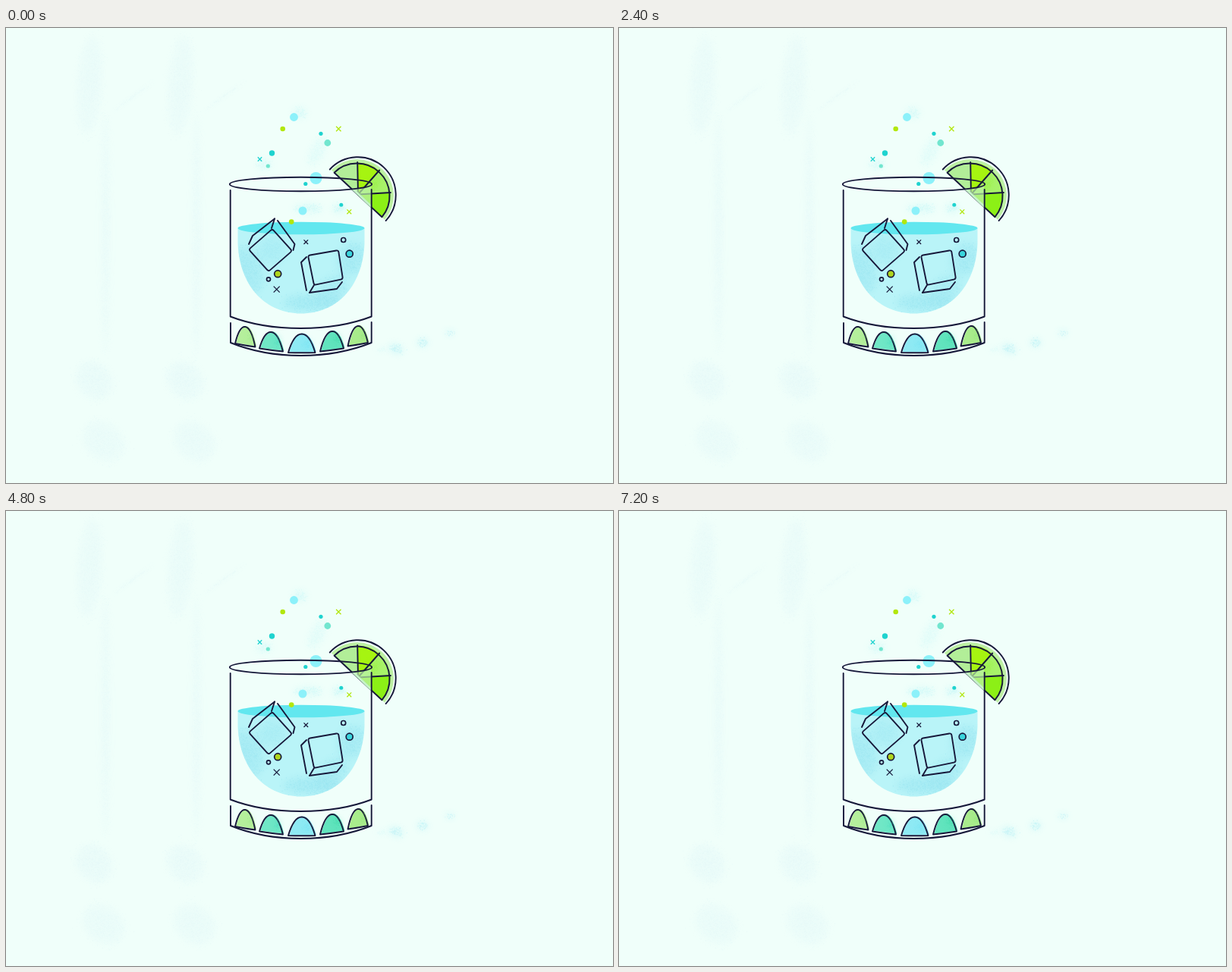
Animation of 800 by 600 pixels, one loop 8000 ms. Source, as an HTML page:

```html
<!DOCTYPE html>
<html lang="en">
<head>
<meta charset="utf-8">
<title>Fizzy drink</title>
<style>
html, body { margin: 0; width: 100%; height: 100%; overflow: hidden; background: #effffa; }
svg { display: block; width: 100vw; height: 100vh; }
.ink { fill: none; stroke: #17183a; stroke-width: 1.9; stroke-linecap: round; stroke-linejoin: round; }
</style>
</head>
<body>
<svg id="stage" viewBox="0 0 800 600"></svg>
<script>
const STEP = 800, LOOP = 8000, POSES = 3;
const INK = '#17183a';
const stage = document.getElementById('stage');

let seed = 7;
const rnd = () => (seed = (seed * 16807) % 2147483647) / 2147483647;
const bell = () => (rnd() + rnd() + rnd() - 1.5) / 1.5;
const mix = (a, b, k) => a + (b - a) * k;

function add(parent, tag, attrs) {
  const el = document.createElementNS('http://www.w3.org/2000/svg', tag);
  for (const name in attrs) el.setAttribute(name, attrs[name]);
  parent.appendChild(el);
  return el;
}
const group = (parent, attrs) => add(parent, 'g', attrs);
const shape = (parent, d, fill) => add(parent, 'path', { d, fill });
const ink = (parent, d) => add(parent, 'path', { d, class: 'ink' });
const dot = (parent, cx, cy, r, fill) => add(parent, 'circle', { cx, cy, r, fill });

function cross(parent, x, y, s, stroke) {
  add(parent, 'path', {
    d: `M${x - s} ${y - s}l${2 * s} ${2 * s}m0 ${-2 * s}l${-2 * s} ${2 * s}`,
    stroke, 'stroke-width': 1.3, fill: 'none'
  });
}

// Soft cloud of fine grains
function spray(parent, x, y, rx, ry, color, opacity, turn = 0) {
  let d = '';
  const n = Math.min(900, Math.round(rx * ry * 0.5));
  for (let i = 0; i < n; i++) {
    d += `M${(bell() * rx).toFixed(1)} ${(bell() * ry).toFixed(1)}h1`;
  }
  const g = group(parent, { transform: `translate(${x} ${y}) rotate(${turn})`, opacity });
  add(g, 'ellipse', { rx: rx * 0.75, ry: ry * 0.75, fill: color, opacity: 0.55, filter: 'url(#soft)' });
  add(g, 'path', { d, stroke: color, 'stroke-width': 1 });
}

function defs() {
  const d = add(stage, 'defs', {});
  const soft = add(d, 'filter', { id: 'soft', x: '-60%', y: '-60%', width: '220%', height: '220%' });
  add(soft, 'feGaussianBlur', { stdDeviation: 4 });
  const clip = add(d, 'clipPath', { id: 'liquid' });
  shape(clip, LIQUID, '#000');
  const inside = add(d, 'clipPath', { id: 'inside' });
  shape(inside, 'M296 207A93 9.5 0 0 0 481 207V260H296Z', '#000');
}

const LIQUID = 'M305.5 264V284C308 343 344 376.5 389 376.5S470 343 472.500 284V264Z';

function smudges(g) {
  for (const x of [0, 120]) {
    const tree = group(g, { transform: `translate(${x} 0)` });
    spray(tree, 110, 75, 22, 85, '#d9f2f6', 0.35, 4);
    spray(tree, 131, 270, 9, 210, '#d9f2f6', 0.3);
    spray(tree, 116, 465, 36, 30, '#d9f2f6', 0.4, 52);
    spray(tree, 128, 545, 40, 32, '#d9f2f6', 0.35, 40);
    spray(tree, 168, 90, 42, 3, '#d9f2f6', 0.3, -36);
  }
  spray(g, 514, 423, 14, 9, '#a9edf5', 0.55, 20);
  spray(g, 549, 415, 10, 8, '#a9edf5', 0.6);
  spray(g, 585, 402, 8, 6, '#a9edf5', 0.45);
  spray(g, 495, 424, 8, 5, '#a9edf5', 0.2);
}

function liquid(g, k) {
  shape(g, LIQUID, ['#b9f4f8', '#b8f5f7', '#b7f6f6'][k * 2]);
  const c = group(g, { 'clip-path': 'url(#liquid)' });
  const tint = k ? '#86ecef' : '#8fe0ee';
  spray(c, mix(318, 340, k), mix(320, 300, k), 28, 42, tint, 0.55, -15);
  spray(c, mix(405, 350, k), mix(362, 350, k), 52, 16, tint, 0.6);
  spray(c, mix(455, 418, k), mix(305, 318, k), 24, 30, tint, 0.55, 20);
  spray(c, mix(350, 455, k), mix(292, 288, k), 26, 24, tint, 0.4);
  spray(c, 430, mix(345, 350, k), 30, 22, tint, 0.45, -35);
  add(g, 'ellipse', { cx: 389, cy: 264, rx: 83.5, ry: 8.3, fill: k === 1 ? '#43e5ec' : '#62e7ef' });
}

const LIME = { x: 464, y: 220 };
function rim(r, deg) {
  const a = deg * Math.PI / 180;
  return `${(LIME.x + r * Math.cos(a)).toFixed(1)} ${(LIME.y + r * Math.sin(a)).toFixed(1)}`;
}
function wedge(g, from, to, fill) {
  shape(g, `M464 219.500L${rim(42.5, from)}A42.5 42.5 0 0 1 ${rim(42.5, to)}Z`, fill);
}

function lime(g, k) {
  shape(g, `M${rim(48, -137)}A48 48 0 0 1 ${rim(48, 43)}Z`, k ? '#b5f49d' : '#bdf0a4');
  wedge(g, -137, -91, k ? '#b4f39b' : '#b2ee98');
  wedge(g, -91, -49, '#a6f411');
  wedge(g, -49, -4, k ? '#aff39f' : '#a8f36a');
  wedge(g, -4, 43, k ? '#a6f411' : '#8cf016');
  spray(g, 484, 206, 15, 10, '#92ee2c', k ? 0.2 : 0.45, -40);
  ink(g, `M${rim(50, -138)}A50 50 0 0 1 ${rim(50, 43)}`);
  ink(g, `M${rim(43, -137)}A43 43 0 0 1 ${rim(43, 43)}Z`);
  ink(g, `M464 219.500L${rim(43, -91)}M464 219.500L${rim(43, -49)}M464 219.500L${rim(43, -4)}`);
  // Part seen through the glass is paler
  const veil = group(g, { 'clip-path': 'url(#inside)' });
  shape(veil, `M${rim(51, -137)}A51 51 0 0 1 ${rim(51, 43)}L${rim(51, -137)}`, 'rgba(188,243,168,.7)');
  add(veil, 'path', { d: 'M440 196L482 236', stroke: '#c5f3c8', 'stroke-width': 3 });
}

function arch(g, x0, y0, x1, y1, ax, ay, fill) {
  const cy = (ay - (y0 + y1) / 8) / 0.75;
  const bend = (x1 - x0) * 0.27;
  const d = `M${x0} ${y0}C${x0 + bend} ${cy} ${x1 - bend} ${cy} ${x1} ${y1}Q${ax} ${(y0 + y1) / 2 + 0.5} ${x0} ${y0}Z`;
  add(g, 'path', { d, fill, transform: 'translate(1.5 -1)' });
  ink(g, d);
}

function glass(g) {
  add(g, 'ellipse', { cx: 388.5, cy: 206, rx: 93.7, ry: 9.3, class: 'ink' });
  ink(g, 'M295.700 214V380.500Q336 396 388.600 396T481.700 380.500V213');
  ink(g, 'M296 389V415Q338 432 388.600 432T481.700 415V388');
  arch(g, 302, 416, 328.5, 420.5, 315, 394, '#b5ef9c');
  arch(g, 334, 422.5, 365, 426.5, 349.5, 401, '#70e7c6');
  arch(g, 372, 428, 407.5, 428, 390, 403.5, '#8feaf4');
  arch(g, 414, 426.5, 445, 422.5, 429, 400, '#62e4be');
  arch(g, 450.5, 419.5, 477, 415, 464, 393, '#a9ec8c');
  spray(g, 322, 408, 5, 8, '#8de47d', 0.4);
  spray(g, 357, 413, 6, 10, '#3fd9bd', 0.45);
  spray(g, 396, 417, 9, 9, '#6adff0', 0.4);
  spray(g, 436, 411, 7, 9, '#36d6a4', 0.45);
  spray(g, 470, 405, 5, 8, '#7fe070', 0.4);
}

// Eleven points per cube: four for the face, seven for the visible sides
const CUBES = [
  [[320, 292, 351, 265, 377, 294, 346, 321, 320, 285, 325, 274, 354, 251.5, 350, 264, 358, 254, 380.5, 285, 378.5, 293],
   [321, 281, 360, 266, 372, 303, 333, 318, 322, 276, 331, 266, 364, 254, 361, 264, 367, 258, 380, 293, 374, 301]],
  [[406, 339, 398, 300, 438, 293, 444, 331, 396, 302, 389, 309, 396, 346, 396, 346, 443, 335, 436, 344, 400, 349],
   [402, 337, 401, 297, 439, 293, 444, 331, 398, 299, 390, 307, 394, 343, 394, 343, 442, 335, 433, 342.5, 397, 347]]
];

function cube(g, [a, b], k, low) {
  const p = i => [mix(a[2 * i], b[2 * i], k), mix(a[2 * i + 1], b[2 * i + 1], k)];
  const line = (...ids) => ink(g, 'M' + ids.map(i => p(i).join(' ')).join('L'));
  let face = '';
  for (let i = 0; i < 4; i++) {
    const q = p(i), before = p((i + 3) % 4), after = p((i + 1) % 4);
    const near = o => [mix(q[0], o[0], 0.07), mix(q[1], o[1], 0.07)].join(' ');
    face += `${i ? 'L' : 'M'}${near(before)}Q${q.join(' ')} ${near(after)}`;
  }
  ink(g, face + 'Z');
  line(4, 5, 6);
  line(8, 9, 10);
  if (low) line(10, 0);
  else line(6, 7);
}

const AQUA = '#8cf1fa', TEAL = '#1fd3cf', MINT = '#72e6cf', GOLD = '#b2e70c';
// [x, y, size] in the first pose and in the last one; size 0 is absent
const FIZZ = [
  [AQUA, 379.5, 117.5, 5.4, 378, 110.5, 3.6],
  [GOLD, 364.7, 133, 3.3, 367.8, 122, 3],
  [TEAL, 415, 139.3, 2.6, 415, 128, 0],
  [MINT, 423.8, 151.5, 4.4, 416.3, 160, 4.1],
  [TEAL, 350.5, 165, 3.7, 371.4, 177, 3.7],
  [MINT, 345.3, 182, 2.6, 344.3, 163.3, 2.9],
  [AQUA, 408.5, 198, 8, 399.8, 149.3, 6.4],
  [TEAL, 394.8, 205.5, 2.6, 394, 190, 0],
  [AQUA, 391, 241, 5.5, 328, 179.7, 6.2],
  [TEAL, 441.8, 233.3, 2.5, 440, 215, 0],
  [GOLD, 376.2, 255.6, 3.3, 364.5, 237.8, 3.3]
];
const SPARKS = [
  [GOLD, 438.3, 133, 3.2, 443.2, 135.3, 2.8],
  [TEAL, 334.5, 173, 2.7, 335.3, 148, 3],
  [GOLD, 452.3, 242.3, 2.9, 409.2, 188.3, 3],
  [INK, 395.3, 282.2, 2.8, 423.2, 278.7, 2.9],
  [INK, 356.7, 344.6, 4, 338.3, 338, 2.6]
];
const RINGS = [
  ['none', 444.7, 279.5, 3, 455.3, 269.2, 2.8],
  ['#39d5dc', 452.7, 297.7, 4.5, 362.8, 328, 4.5],
  ['#afd51c', 358.2, 324.2, 4.5, 443.8, 282.2, 3.7],
  ['none', 346, 331.3, 2.5, 378.4, 318, 2.5]
];

function each(list, k, draw) {
  for (const [color, x0, y0, s0, x1, y1, s1] of list) {
    const s = mix(s0, s1, k);
    if (s > 0) draw(mix(x0, x1, k), mix(y0, y1, k), s, color);
  }
}

function mist(g, k) {
  const c = '#a4f0f4';
  if (k < 1) {
    spray(g, 387, 112, 13, 11, c, 0.3);
    spray(g, 410, 163, 13, 28, c, 0.2, 25);
    spray(g, 340, 180, 15, 11, c, 0.25);
    spray(g, 398, 238, 26, 9, c, 0.35);
    spray(g, 439, 238, 13, 9, c, 0.4);
  }
  if (k > 0) {
    spray(g, 368, 112, 19, 20, c, 0.4, 20);
    spray(g, 343, 153, 24, 16, c, 0.32, -45);
    spray(g, 325, 183, 12, 9, c, 0.4);
    spray(g, 432, 142, 18, 14, c, 0.3, -30);
    spray(g, 375, 211, 42, 12, c, 0.45);
    spray(g, 368, 235, 16, 16, c, 0.3);
    spray(g, 430, 204, 25, 9, c, 0.25);
  }
}

function drink(k) {
  const g = group(stage, {});
  add(g, 'rect', { width: 800, height: 600, fill: k === 1 ? '#edfffa' : '#f0fffa' });
  seed = 7;
  smudges(g);
  mist(g, k);
  liquid(g, k);
  lime(g, k);
  each(FIZZ, k, (x, y, r, c) => dot(g, x, y, r, c));
  glass(g);
  cube(g, CUBES[0], k, false);
  cube(g, CUBES[1], k, true);
  each(RINGS, k, (x, y, r, c) => {
    const ring = dot(g, x, y, r, c);
    ring.setAttribute('stroke', INK);
    ring.setAttribute('stroke-width', 1.7);
  });
  each(SPARKS, k, (x, y, s, c) => cross(g, x, y, s, c));
  return g;
}

defs();
const poses = [0, 0.5, 1].map(drink);

function show(now) {
  const pose = Math.floor((now % LOOP) / STEP) % POSES;
  poses.forEach((g, i) => g.setAttribute('display', i === pose ? 'inline' : 'none'));
}
function tick() {
  show(performance.now());
  requestAnimationFrame(tick);
}
tick();
</script>
</body>
</html>
```
